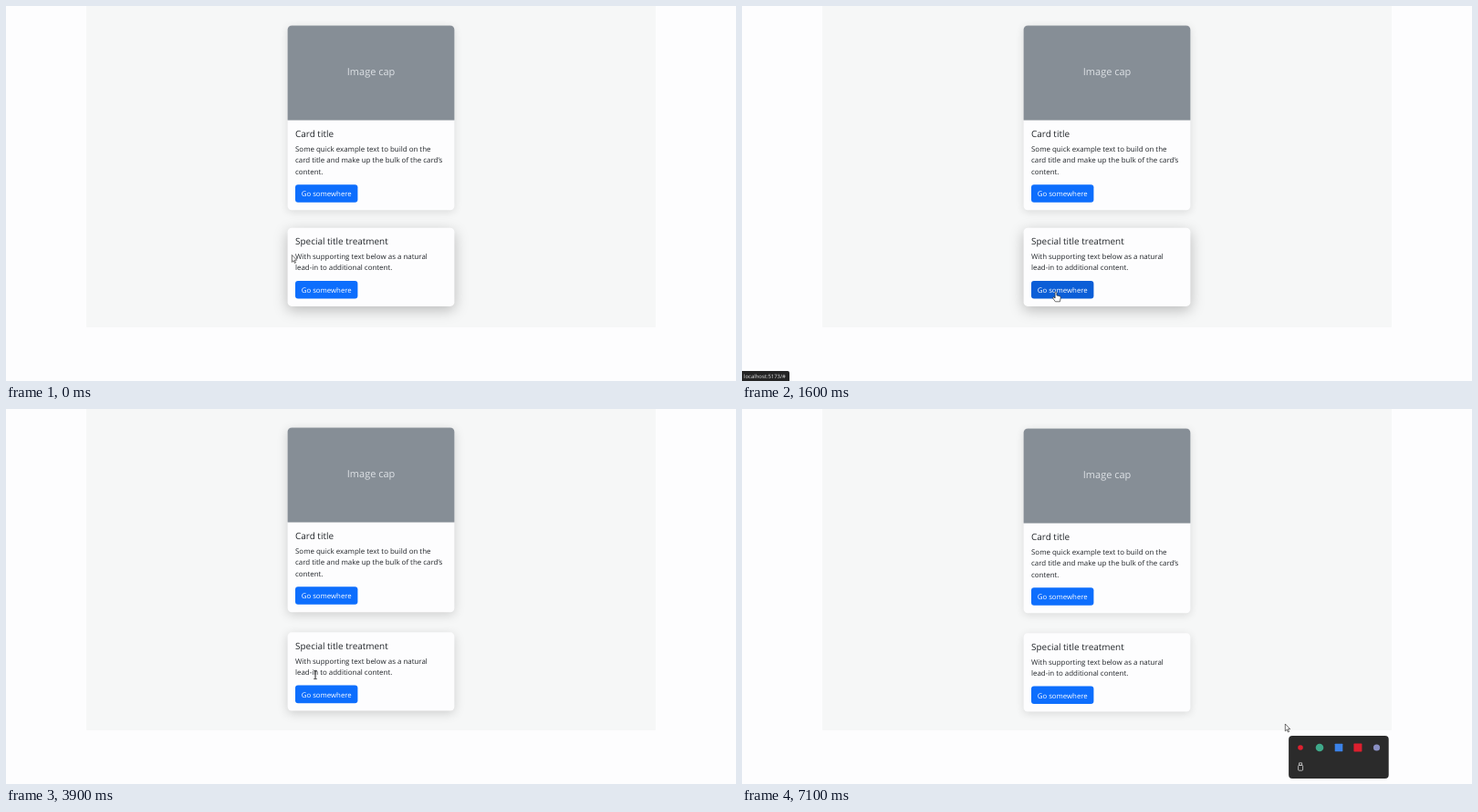
These frames come from a looping animation (800 by 412 pixels, 7200 ms). An HTML page with a canvas:

```html
<!DOCTYPE html>
<html lang="en">
<head>
<meta charset="utf-8">
<title>Card hover</title>
<style>
  html, body { margin: 0; width: 100%; height: 100%; overflow: hidden; background: #fdfdfe; }
  canvas { display: block; width: 800px; height: 412px; }
</style>
</head>
<body>
<canvas id="stage" width="800" height="412"></canvas>
<script>
const ctx = document.getElementById('stage').getContext('2d');
const LOOP = 7200, STEP = 100;
const WHITE = '#fdfdfe', INK = '#212529';
const FONT = '"Open Sans", "Noto Sans", sans-serif';
const CARD = { x: 308.6, w: 182.8 }, BTN = { x: 317, w: 68.4, h: 19.6 };
const LINE = 12.5, LIFT = 2.6;

// Pointer moves: start, end, x, y; it rests in between
const START = [313, 273];
const moves = [
  [0, 400, 350, 206],
  [960, 1000, 308, 249],
  [1000, 1500, 344, 314],
  [2200, 2500, 342, 234],
  [2750, 2800, 333, 150],
  [2800, 3100, 333, 162],
  [3100, 3600, 345, 185],
  [3725, 3900, 339, 292],
  [4100, 4400, 370, 298],
  [4400, 4800, 658, 400],
  [4800, 4900, 670, 430],
  [6090, 6100, 694, 382],
  [6100, 6400, 562, 336],
  [6400, 6600, 613, 350],
  [6800, 6900, 565, 338],
  [7000, 7100, 595, 345.5]
];

// Spans in which the whole screen freezes
const stalls = [[2800, 3100], [3900, 4100], [4900, 5200]];

const cards = [
  { top: 21.4, cap: 104.1, title: 'Card title',
    lines: ['Some quick example text to build on the',
            'card title and make up the bulk of the card\u2019s', 'content.'] },
  { top: 246.3, cap: 0, title: 'Special title treatment',
    lines: ['With supporting text below as a natural', 'lead-in to additional content.'] }
];

const mix = (a, b, k) => a + (b - a) * k;
const clamp = v => Math.max(0, Math.min(1, v));
const within = ([px, py], x, y, w, h) => px >= x && px <= x + w && py >= y && py <= y + h;

// CSS "ease" timing curve
function ease(x) {
  if (x <= 0 || x >= 1) return clamp(x);
  let lo = 0, hi = 1, u = 0.5;
  for (let i = 0; i < 20; i++) {
    u = (lo + hi) / 2;
    if (0.75 * u * (1 - u) + u ** 3 < x) lo = u; else hi = u;
  }
  return 0.3 * u * (1 - u) ** 2 + 3 * u * u * (1 - u) + u ** 3;
}

function pointerAt(t) {
  let [x, y] = START;
  for (const [from, to, toX, toY] of moves) {
    const k = clamp((t - from) / (to - from));
    x = mix(x, toX, k);
    y = mix(y, toY, k);
  }
  return [x, y];
}

// Times at which the pointer enters or leaves a resting area
function crossings(...area) {
  const list = [];
  let inside = false;
  for (let t = 0; t < LOOP; t += 5) {
    if (within(pointerAt(t), ...area) === inside) continue;
    inside = !inside;
    list.push([t || -LOOP, +inside]);
  }
  return list;
}

// Value of a transition that is retargeted at the given times
function level(keys, t, duration) {
  return keys.reduce((value, [start, target], i) => {
    const end = Math.min(t, keys[i + 1]?.[0] ?? t);
    return mix(value, target, ease((end - start) / duration));
  }, 0);
}

for (const card of cards) {
  card.body = card.cap;
  card.btn = card.cap + 33.2 + LINE * card.lines.length;
  card.h = card.btn + 28;
  card.hover = crossings(CARD.x, card.top, CARD.w, card.h);
  card.press = crossings(BTN.x, card.top + card.btn, BTN.w, BTN.h);
}

function box(x, y, w, h, r, color) {
  ctx.beginPath();
  ctx.roundRect(x, y, w, h, r);
  ctx.fillStyle = color;
  ctx.fill();
}

function disc(x, y, r, color) {
  box(x - r, y - r, 2 * r, 2 * r, r, color);
}

function label(text, x, y, size, color, weight = 400, align = 'left') {
  ctx.font = `${weight} ${size}px ${FONT}`;
  ctx.textRendering = 'geometricPrecision';
  ctx.textAlign = align;
  ctx.fillStyle = color;
  ctx.fillText(text, x, y);
  return ctx.measureText(text).width;
}

// Draws a card and returns the pointer kind it asks for
function drawCard(card, t, pointer) {
  const up = level(card.hover, t, 300), dark = level(card.press, t, 150);
  const y = card.top - LIFT * up, body = y + card.body, btn = y + card.btn;
  let kind = '';

  ctx.save();
  ctx.shadowColor = `rgba(0,0,0,${mix(0.12, 0.25, up)})`;
  ctx.shadowBlur = mix(10, 15, up);
  ctx.shadowOffsetY = mix(2, 4.2, up);
  box(CARD.x, y, CARD.w, card.h, 4.5, WHITE);
  ctx.restore();

  if (card.cap) {
    box(CARD.x, y, CARD.w, card.cap, [4.5, 4.5, 0, 0], '#868e96');
    label('Image cap', 400, y + 55, 10.98, '#dee2e6', 400, 'center');
  }

  const copy = (text, top, rise, size, weight) => {
    const w = label(text, BTN.x, top + rise, size, INK, weight);
    if (within(pointer, BTN.x, top, w, LINE)) kind = 'text';
  };
  copy(card.title, body + 8.3, 10.2, 9.96, 500);
  card.lines.forEach((line, i) => copy(line, body + 25 + i * LINE, 9.2, 7.93, 400));

  const blue = `rgb(${mix(13, 11, dark)},${mix(110, 94, dark)},${mix(253, 215, dark)})`;
  box(BTN.x, btn, BTN.w, BTN.h, 3, blue);
  label('Go somewhere', BTN.x + BTN.w / 2, btn + 13.2, 7.8, '#fff', 400, 'center');
  if (within(pointer, BTN.x, btn, BTN.w, BTN.h)) kind = 'hand';
  return kind;
}

function drawStatus() {
  box(0, 401, 52, 12, [0, 2, 0, 0], '#242424');
  label('localhost:5173/#', 2, 409, 5.93, '#e4e4e4');
}

function drawTray(t) {
  ctx.save();
  ctx.translate(0, 54 * (1 - ease((t - 5130) / 520)));
  box(599.1, 359.1, 109.6, 46.9, 4, '#2b2b2b');
  disc(612, 372, 2.8, '#e0202f');
  disc(633, 372, 4.3, '#3fa98a');
  box(649.7, 367.7, 8.6, 8.6, 0.6, '#3b82e8');
  box(670.4, 367.6, 9, 8.8, 0.6, '#dc1f2e');
  disc(695.5, 372, 3.6, '#8a90c4');
  ctx.strokeStyle = '#d8d8d8';
  ctx.lineWidth = 0.8;
  ctx.beginPath();
  ctx.roundRect(609.6, 391.4, 5, 5.8, 1);
  ctx.rect(610.6, 388.8, 3, 2.6);
  ctx.stroke();
  ctx.restore();
}

const arrow = new Path2D('M.3 .5V8.4L2.1 6.7L3.4 9.5L4.5 9L3.3 6.2H5.7Z');
const hand = new Path2D('M-.9 .5Q0-.7.9.5V4L4.3 4.8Q5.4 5.2 5.2 6.5L4.4 10.8H-.6L-3.3 7Q-3.6 5.6-2.2 5.9L-.9 7Z');
const beam = new Path2D('M-1.6-4.6H-.5L0-4.2L.5-4.6H1.6M0-4.2V4.2M-1.6 4.6H-.5L0 4.2L.5 4.6H1.6');

function drawPointer([x, y], kind) {
  const shape = { text: beam, hand }[kind] || arrow;
  ctx.save();
  ctx.translate(x, y);
  ctx.lineJoin = 'round';
  ctx.strokeStyle = '#222';
  ctx.lineWidth = kind === 'text' ? 1 : 0.65;
  ctx.fillStyle = '#fff';
  if (kind !== 'text') ctx.fill(shape);
  ctx.stroke(shape);
  ctx.restore();
}

function draw(t) {
  const stall = stalls.find(([a, b]) => t >= a && t < b);
  if (stall) t = stall[0];
  const pointer = pointerAt(t);

  ctx.fillStyle = WHITE;
  ctx.fillRect(0, 0, 800, 412);
  ctx.fillStyle = '#f6f7f7';
  ctx.fillRect(88, 0, 624, 353);

  const kinds = cards.map(card => drawCard(card, t, pointer));
  if (t >= 800 && t < 2400) drawStatus();
  if (t >= 5200) drawTray(t);
  drawPointer(pointer, kinds.find(Boolean));
}

const began = performance.now();
function tick() {
  const t = (performance.now() - began) % LOOP;
  draw(Math.floor(t / STEP) * STEP);
  requestAnimationFrame(tick);
}
tick();
</script>
</body>
</html>
```
